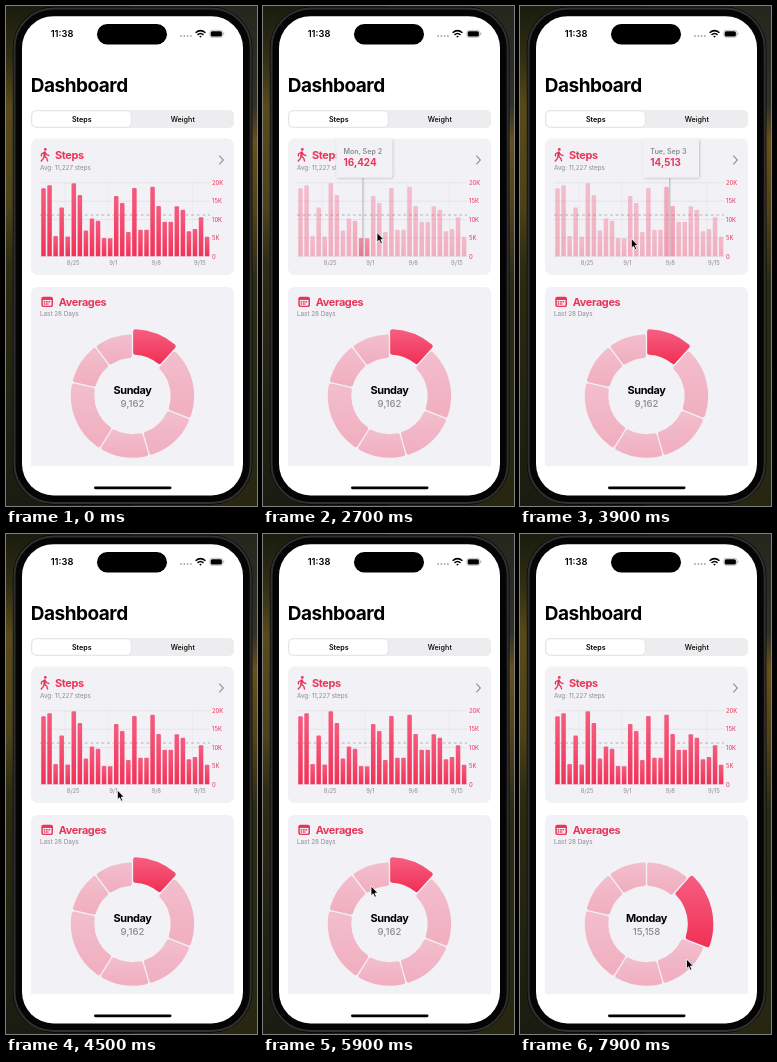
An HTML page that plays this animation: 251 by 500 pixels, repeating every 8000 ms.

```html
<!DOCTYPE html>
<html lang="en">
<head>
<meta charset="utf-8">
<title>Dashboard</title>
<style>
  html, body { margin: 0; width: 100%; height: 100%; overflow: hidden; background: #1d200f; }
  svg { display: block; width: 100vw; height: 100vh; font-family: Inter, "Open Sans", sans-serif; }
  .pink { fill: #eb3459; }
  .gray { fill: #8b8b90; }
  .heading { font-size: 10.9px; font-weight: 700; letter-spacing: -.35px; }
  .caption { font-size: 6.3px; }
  .tick { font-size: 5.9px; }
  .mid { text-anchor: middle; }
  .grid { stroke: #000; stroke-opacity: .1; stroke-width: .6; }
</style>
</head>
<body>
<svg viewBox="0 0 251 500" preserveAspectRatio="none">
  <defs>
    <linearGradient id="meadowLeft" x2="0" y2="1">
      <stop offset="0" stop-color="#1b1c10"/>
      <stop offset=".1" stop-color="#2f2d14"/>
      <stop offset=".2" stop-color="#594a19"/>
      <stop offset=".4" stop-color="#4d421a"/>
      <stop offset=".52" stop-color="#2c2b13"/>
      <stop offset="1" stop-color="#191c10"/>
    </linearGradient>
    <linearGradient id="meadowRight" x2="0" y2="1">
      <stop offset="0" stop-color="#24271d"/>
      <stop offset=".2" stop-color="#30322a"/>
      <stop offset=".27" stop-color="#67501c"/>
      <stop offset=".42" stop-color="#4e4119"/>
      <stop offset=".55" stop-color="#2b2b14"/>
      <stop offset="1" stop-color="#272711"/>
    </linearGradient>
    <linearGradient id="pinkFade" x2="0" y2="1">
      <stop offset="0" stop-color="#f55c7f"/>
      <stop offset="1" stop-color="#f13257"/>
    </linearGradient>
    <filter id="shadow" x="-20%" y="-20%" width="140%" height="150%">
      <feDropShadow dx=".8" dy=".8" stdDeviation="1" flood-opacity=".22"/>
    </filter>
  </defs>

  <rect width="126" height="500" fill="url(#meadowLeft)"/>
  <rect x="126" width="125" height="500" fill="url(#meadowRight)"/>
  <rect x="6.800" y=".8" width="239.600" height="498" rx="41" fill="#050506"/>
  <rect x="8.500" y="2.500" width="236.200" height="494.600" rx="39" fill="none" stroke="#303032" stroke-width="2"/>
  <rect x="16" y="10.200" width="221" height="479.200" rx="31.500" fill="#fff"/>

  <rect x="91" y="18" width="70" height="20.500" rx="10.250"/>
  <text x="56" y="31.300" class="mid" font-size="9.3" font-weight="600">11:38</text>
  <g fill="#a5a5a8">
    <circle cx="175" cy="30" r=".9"/><circle cx="178.300" cy="30" r=".9"/>
    <circle cx="181.600" cy="30" r=".9"/><circle cx="184.900" cy="30" r=".9"/>
  </g>
  <g fill="none" stroke="#000" stroke-width="1.5">
    <path d="M189.600 26.800Q194.500 22.400 199.400 26.800M191.500 28.900Q194.500 26.200 197.500 28.900"/>
    <path d="M193.200 30.300Q194.500 29.300 195.800 30.300L194.500 31.700Z" fill="#000" stroke="none"/>
  </g>
  <rect x="203.800" y="24.300" width="13" height="7" rx="2.200" fill="none" stroke="#999" stroke-width=".6"/>
  <rect x="204.700" y="25.200" width="11.200" height="5.200" rx="1.500"/>
  <path d="M217.700 26.800v2" stroke="#999" stroke-width=".9"/>

  <text x="24.800" y="86" font-size="19" font-weight="700" letter-spacing="-.5">Dashboard</text>

  <rect x="25" y="104" width="203" height="18" rx="5" fill="#ededef"/>
  <rect x="26" y="105" width="99" height="16" rx="4.200" fill="#fff" stroke="#000" stroke-opacity=".07" stroke-width=".8"/>
  <g class="mid" font-size="7.2">
    <text x="75.800" y="116" font-weight="600">Steps</text>
    <text x="176.800" y="116" font-weight="500">Weight</text>
  </g>

  <rect x="25" y="132.500" width="203" height="136.500" rx="7" fill="#f1f1f6"/>
  <g fill="none" stroke="#eb3459" stroke-width="1.3" stroke-linecap="round" stroke-linejoin="round">
    <circle cx="39.300" cy="143.400" r="1.400" fill="#eb3459" stroke="none"/>
    <path d="M35.400 150V148L38.700 146.100 40.800 148.700 43 149.600M38.700 146.300 38.100 150.200 40.600 152 41.600 155M37.700 151.200 37 153 35.200 155"/>
    <path d="M38.900 146.700 38.500 150" stroke-width="2.200"/>
  </g>
  <text x="49" y="153" class="pink heading">Steps</text>
  <text x="34" y="164" class="gray caption">Avg: 11,227 steps</text>
  <path d="M213.300 149.700l4 4.300-4 4.300" fill="none" stroke="#96969b" stroke-width="1.200"/>
  <g id="axes"></g>
  <path d="M34 209H204" stroke="#96969b" stroke-width=".7" stroke-dasharray="2.8 2.8"/>
  <g id="bars"></g>
  <g id="tip">
    <path d="M0 172V250.300" stroke="#a3a3a8" stroke-width=".8"/>
    <g filter="url(#shadow)"><rect x="-26.800" y="132.500" width="56" height="39" rx="2" fill="#f1f1f6"/></g>
    <text id="tipDate" x="-19.500" y="147.600" class="gray" font-size="7.1" font-weight="600"></text>
    <text id="tipValue" x="-19.500" y="160" class="pink" font-size="9.9" font-weight="700"></text>
  </g>

  <path d="M25 460V288Q25 281 32 281H221Q228 281 228 288V460Z" fill="#f1f1f6"/>
  <rect x="35.300" y="290.800" width="11.700" height="10.300" rx="2" fill="#eb3459"/>
  <path d="M36.800 294H45.500V298.500Q45.500 299.700 44.300 299.700H38Q36.800 299.700 36.800 298.500Z" fill="#f1f1f6"/>
  <path d="M37.700 295.700H44.800M37.700 298H43" stroke="#eb3459" stroke-width="1.600" stroke-dasharray="1.600 .8"/>
  <text x="52.800" y="300.200" class="pink heading">Averages</text>
  <text x="34" y="310.400" class="gray caption">Last 28 Days</text>
  <g id="donut"></g>
  <g class="mid">
    <text id="dayName" x="126.500" y="388" class="heading"></text>
    <text id="dayValue" x="126.500" y="401.300" class="gray" font-size="9.6" font-weight="500"></text>
  </g>

  <rect x="88" y="480.500" width="77.500" height="2.700" rx="1.350"/>
  <path id="cursor" d="M0 0V9.700L2.200 7.700 3.700 11.200 5.400 10.500 3.900 7.100H6.900Z" stroke="#fff" stroke-width=".8" stroke-linejoin="round"/>
</svg>

<script>
const LOOP = 8000, FRAME = 200;
const steps = [
  18500, 19300, 5500, 13300, 5400, 19900, 16700, 7000, 10300, 9700, 5000, 4900, 16424, 14513,
  6600, 18600, 7200, 7200, 18900, 13700, 9400, 9400, 13600, 12700, 6792, 7448, 10608, 5300
];
const days = ['Sunday', 'Monday', 'Tuesday', 'Wednesday', 'Thursday', 'Friday', 'Saturday'];
const BASE = 250.3, PLOT_HEIGHT = 73.5;
const BAR_GAP = 6.06, BAR_WIDTH = 4.5, FIRST_BAR = 37.5;
const CENTER = { x: 126.5, y: 390 }, CORNER = 2.3;

const $ = id => document.getElementById(id);
const clamp = v => Math.min(1, Math.max(0, v));
const smooth = v => (v = clamp(v)) * v * (3 - 2 * v);
const number = n => Math.round(n).toLocaleString('en-US');
const yOf = value => BASE - value / 20000 * PLOT_HEIGHT;
const barX = i => FIRST_BAR + i * BAR_GAP;

function add(parent, tag, attrs, text) {
  const node = document.createElementNS(parent.namespaceURI, tag);
  for (const key in attrs) node.setAttribute(key, attrs[key]);
  if (text) node.textContent = text;
  return parent.appendChild(node);
}

// Interpolates rows of [time, ...values].
function track(rows, t, ease = smooth) {
  const next = rows.findIndex(row => row[0] > t);
  if (next === 0) return rows[0].slice(1);
  if (next < 0) return rows[rows.length - 1].slice(1);
  const a = rows[next - 1], b = rows[next];
  const k = ease((t - a[0]) / (b[0] - a[0]));
  return a.slice(1).map((v, i) => v + (b[i + 1] - v) * k);
}

for (let k = 0; k <= 20; k += 5) {
  const y = yOf(k * 1000);
  add($('axes'), 'path', { d: `M34 ${y}H204`, class: 'grid' });
  add($('axes'), 'text', { x: 206, y: y + 2.3, class: 'pink tick' }, k ? k + 'K' : '0');
}
['8/25', '9/1', '9/8', '9/15'].forEach((label, week) => {
  const x = barX(4 + week * 7) - 2.5;
  add($('axes'), 'path', { d: `M${x} 177V${BASE}`, class: 'grid', 'stroke-dasharray': '1 1' });
  add($('axes'), 'text', { x: x + 1.5, y: 258.8, class: 'gray tick' }, label);
});

const bars = steps.map((value, i) => {
  const x = barX(i) - BAR_WIDTH / 2, y = yOf(value);
  return add($('bars'), 'path', {
    d: `M${x} ${BASE}V${y + 1}q0-1 1-1h${BAR_WIDTH - 2}q1 0 1 1V${BASE}Z`, fill: 'url(#pinkFade)'
  });
});

const averages = days.map((_, day) =>
  steps.reduce((sum, v, i) => sum + ((i + 3) % 7 === day ? v : 0), 0) / 4);
const total = averages.reduce((a, b) => a + b);
let angle = 0;
const sectors = averages.map(value => {
  const start = angle;
  angle += value / total * Math.PI * 2;
  return {
    start, end: angle,
    node: add($('donut'), 'path', {
      fill: 'url(#pinkFade)', stroke: 'url(#pinkFade)',
      'stroke-width': CORNER * 2, 'stroke-linejoin': 'round'
    })
  };
});

// The round-joined stroke gives the sector its soft corners.
function sectorPath(start, end, outer) {
  const r = outer - CORNER, inner = outer * .618 + CORNER, inset = CORNER + .65;
  const point = (radius, a) =>
    `${CENTER.x + radius * Math.sin(a)} ${CENTER.y - radius * Math.cos(a)}`;
  const outInset = Math.asin(inset / r), inInset = Math.asin(inset / inner);
  return `M${point(r, start + outInset)}A${r} ${r} 0 0 1 ${point(r, end - outInset)}` +
    `L${point(inner, end - inInset)}A${inner} ${inner} 0 0 0 ${point(inner, start + inInset)}Z`;
}

const cursorPath = [
  [1100, -10, 330], [1900, 62, 227], [2300, 62, 227], [2700, 114, 226.5], [3100, 172, 228],
  [3500, 165, 231], [3900, 111.3, 232.5], [4300, 108, 238], [5100, 129.5, 353], [5500, 127, 353],
  [5900, 108, 352], [6300, 108, 352], [6900, 171, 386], [7300, 170, 388], [7900, 166.5, 425]
];
// Time, position of the rule, strength of the highlight around it.
const rulePath = [
  [2300, 62, .4], [2700, 100, .5], [3300, 168, .3], [3500, 168, .3], [3900, 149.8, .17], [4100, 118, .3]
];
const pickedBar = [[2300, 4], [2700, 12], [3100, 21], [3500, 20], [3900, 13], [4100, 12]];
const clicks = [{ at: -1000, day: 0 }, { at: 6300, day: 6 }, { at: 7100, day: 1 }];

function drawChart(t) {
  const active = t >= 2300 && t < 4300;
  const dim = smooth((t - 2100) / 400) * (1 - smooth((t - 4100) / 400));
  const [x, glow] = track(rulePath, t, clamp);
  bars.forEach((bar, i) => {
    const near = active ? glow * clamp(1.5 - Math.abs(barX(i) - x) / 6) : 0;
    bar.setAttribute('opacity', 1 - .65 * dim * (1 - near));
  });
  $('tip').setAttribute('visibility', active ? 'visible' : 'hidden');
  $('tip').setAttribute('transform', `translate(${x} 0)`);
  const i = Math.round(track(pickedBar, t, clamp)[0]);
  $('tipDate').textContent = new Date(2024, 7, 21 + i).toLocaleDateString('en-US',
    { weekday: 'short', month: 'short', day: 'numeric' });
  $('tipValue').textContent = number(steps[i]);
}

function drawDonut(t) {
  const current = clicks.filter(c => c.at <= t).length - 1;
  const { at, day } = clicks[current];
  const k = smooth((t - at + 60) / 360);
  sectors.forEach(({ start, end, node }, i) => {
    const weight = i === day ? k : current && i === clicks[current - 1].day ? 1 - k : 0;
    node.setAttribute('d', sectorPath(start, end, 61.7 + 5.1 * weight));
    node.setAttribute('opacity', .34 + .66 * weight);
  });
  $('dayName').textContent = days[day];
  $('dayValue').textContent = number(averages[day]);
}

function draw(time) {
  const now = time % LOOP;
  const t = now < 100 ? 0 : Math.floor((now - 100) / FRAME) * FRAME + 100;
  drawChart(t);
  drawDonut(t);
  const [x, y] = track(cursorPath, t);
  $('cursor').setAttribute('transform', `translate(${x} ${y})`);
}

const begin = performance.now();
function loop() {
  draw(performance.now() - begin);
  requestAnimationFrame(loop);
}
loop();
</script>
</body>
</html>
```
